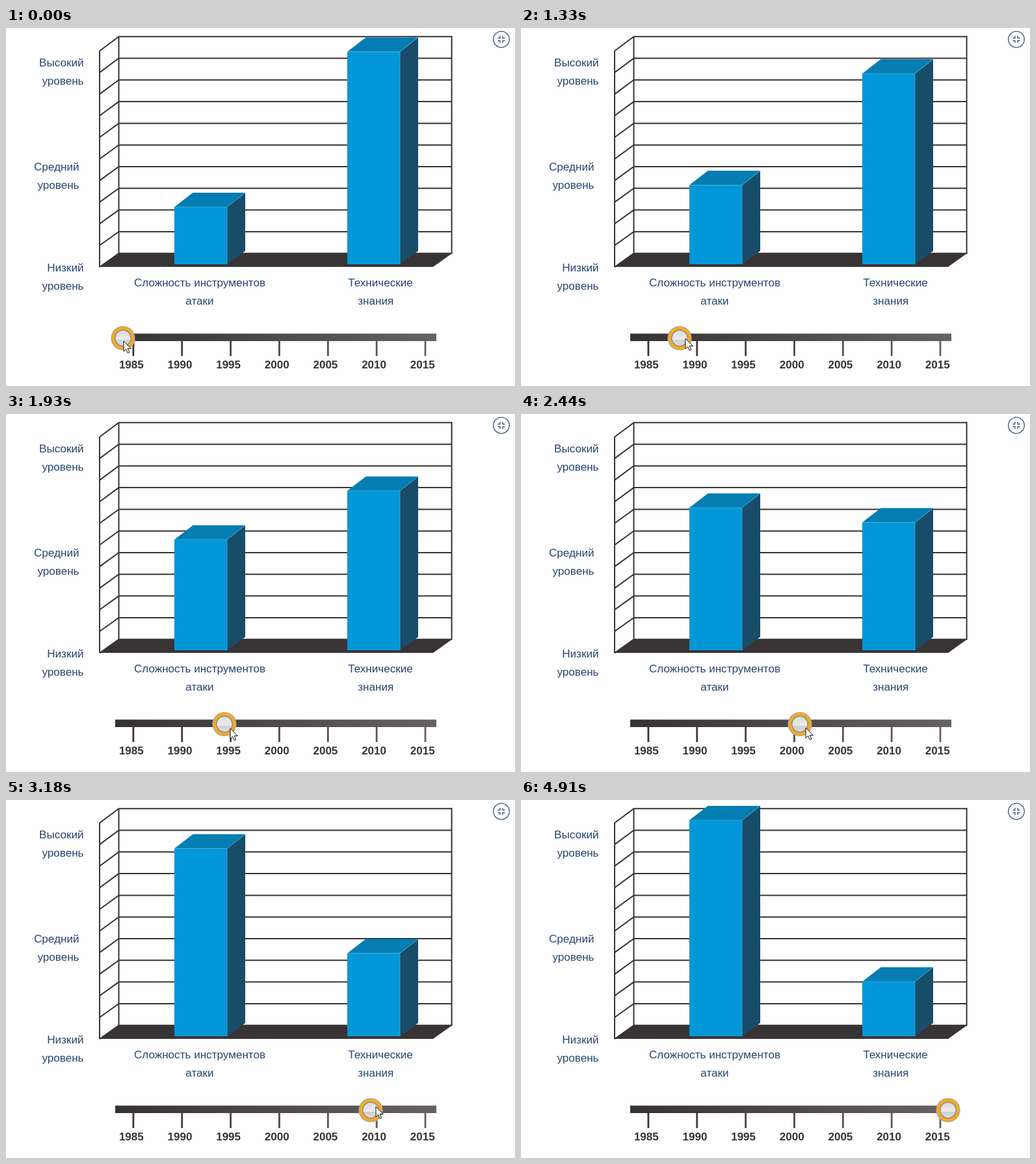
Animation, 783 px wide and 550 px high, one loop 5.33 s. Source, as an HTML page:

```html
<!DOCTYPE html>
<html lang="ru">
<head>
<meta charset="utf-8">
<style>
html, body { margin: 0; width: 100%; height: 100%; overflow: hidden; background: #fefefe; }
svg { display: block; }
text { font: 17.1px "Liberation Sans", Arial, sans-serif; fill: #27446f; text-anchor: middle; }
.end { text-anchor: end; }
.year { font-size: 17px; font-weight: bold; fill: #383334; }
.front { fill: #0297d8; }
.top { fill: #047db3; }
.side { fill: #174d69; }
.edge { fill: none; stroke: #58b4de; stroke-width: .7; }
</style>
</head>
<body>
<svg width="783" height="550" viewBox="0 0 783 550">
  <defs>
    <linearGradient id="rail" gradientUnits="userSpaceOnUse" x1="168" x2="662" y1="0" y2="0">
      <stop stop-color="#363132"/><stop offset="1" stop-color="#666264"/>
    </linearGradient>
    <linearGradient id="knob" x1="0" y1="0" x2="0" y2="1">
      <stop stop-color="#dcdcde"/><stop offset=".58" stop-color="#ebebec"/>
      <stop offset=".62" stop-color="#cfcfd1"/><stop offset="1" stop-color="#dedee0"/>
    </linearGradient>
  </defs>
  <path id="grid" fill="none" stroke="#383334" stroke-width="2"/>
  <path d="M173 346H686.5L657 367H143Z" fill="#383334"/>
  <g id="bars"></g>
  <g id="labels"></g>
  <g id="scale" fill="url(#rail)"><rect x="168" y="469.500" width="494" height="11.500"/></g>
  <g fill="none" stroke="#33597f" stroke-width="1.300">
    <circle cx="762" cy="17.500" r="12.300"/>
    <path d="M756.500 15.500h3.500v-3.500M767.500 15.500h-3.500v-3.500M756.500 19.500h3.500v3.500M767.500 19.500h-3.500v3.500"/>
  </g>
  <g id="handle">
    <circle r="18.600" fill="#a3a7b1"/>
    <circle r="17.200" fill="#f9ab17"/>
    <circle r="12.200" fill="url(#knob)" stroke="#8d8c8c" stroke-width="1.500"/>
  </g>
  <path id="cursor" d="M.5.500V16.500L4.200 13L6.800 19L9.300 18L6.700 12H11.800Z" fill="#fff" stroke="#111"/>
</svg>
<script>
const LOOP = 5330, START = 530, STEP = 125.9;
// step, handle x, cursor x, cursor y
const PATH = [
  [0, 180, 181, 481], [1, 181, 184, 482], [4, 200, 208, 484], [7, 244, 253, 477],
  [12, 336, 345, 483], [16, 429, 438, 482], [22, 561, 569, 471], [26, 648, 652, 471],
  [27, 657, 670, 472], [28, 657, 682, 473], [32, 657, 682, 473], [35, 657, 790, 570]
];

const $ = id => document.getElementById(id);
const range = (n, f) => Array.from({ length: n }, (_, i) => f(i)).join('');
const text = (cls, x, y, s) => `<text class="${cls}" x="${x}" y="${y}">${s}</text>`;

// Two-line label
const label = (cls, x, y, first, second, x2 = x) =>
  text(cls, x, y, first) + text(cls, x2, y + 28, second);

$('grid').setAttribute('d', 'M144 35V367M173.500 13V347M685.600 12V347' +
  range(11, i => `M144 ${35.2 + 33.2 * i}L173.500 ${13.2 + 33.3 * i}H685.600`));

$('labels').innerHTML =
  label('end', 119.5, 59, 'Высокий', 'уровень') +
  label('end', 112.5, 219, 'Средний', 'уровень') +
  label('end', 119.5, 374, 'Низкий', 'уровень') +
  label('mid', 298, 397, 'Сложность инструментов', 'атаки') +
  label('mid', 576, 397, 'Технические', 'знания', 568.7) +
  range(7, i => text('year', 192.8 + 74.65 * i, 522.5, 1985 + 5 * i));

$('scale').innerHTML += range(7, i =>
  `<rect x="${194.5 + 74.85 * i}" y="480" width="2.800" height="24"/>`);

function bar(x, y) {
  const r = x + 81, b = r + 28;
  return `<path class="side" d="M${r} ${y}L${b} ${y - 22}V342.500L${r} 363Z"/>
    <path class="top" d="M${x} ${y}l28.500 -22H${b}L${r} ${y}Z"/>
    <path class="front" d="M${x} ${y}H${r}V363H${x}Z"/>
    <path class="edge" d="M${x} ${y}H${r}V363M${r} ${y}L${b} ${y - 22}"/>`;
}

function pose(n) {
  const i = PATH.findIndex(k => k[0] > n);
  if (i < 0) return PATH.at(-1);
  const a = PATH[i - 1], b = PATH[i], u = (n - a[0]) / (b[0] - a[0]);
  return a.map((v, j) => v + (b[j] - v) * u);
}

const move = (id, x, y) => $(id).setAttribute('transform', `translate(${x} ${y})`);

function draw(now) {
  const t = now % LOOP;
  const [, x, cx, cy] = pose(Math.max(0, Math.floor((t - START) / STEP) + 1));
  const d = x - 180;
  $('bars').innerHTML = bar(259, Math.max(31, 275 - .526 * d)) +
    bar(525, Math.min(279, 36.5 + .522 * d));
  move('handle', x, 476.5);
  move('cursor', Math.round(cx) - .5, Math.round(cy) - .5);
}

let start;
function tick(now) {
  start ??= now;
  draw(now - start);
  requestAnimationFrame(tick);
}
draw(0);
requestAnimationFrame(tick);
</script>
</body>
</html>
```
